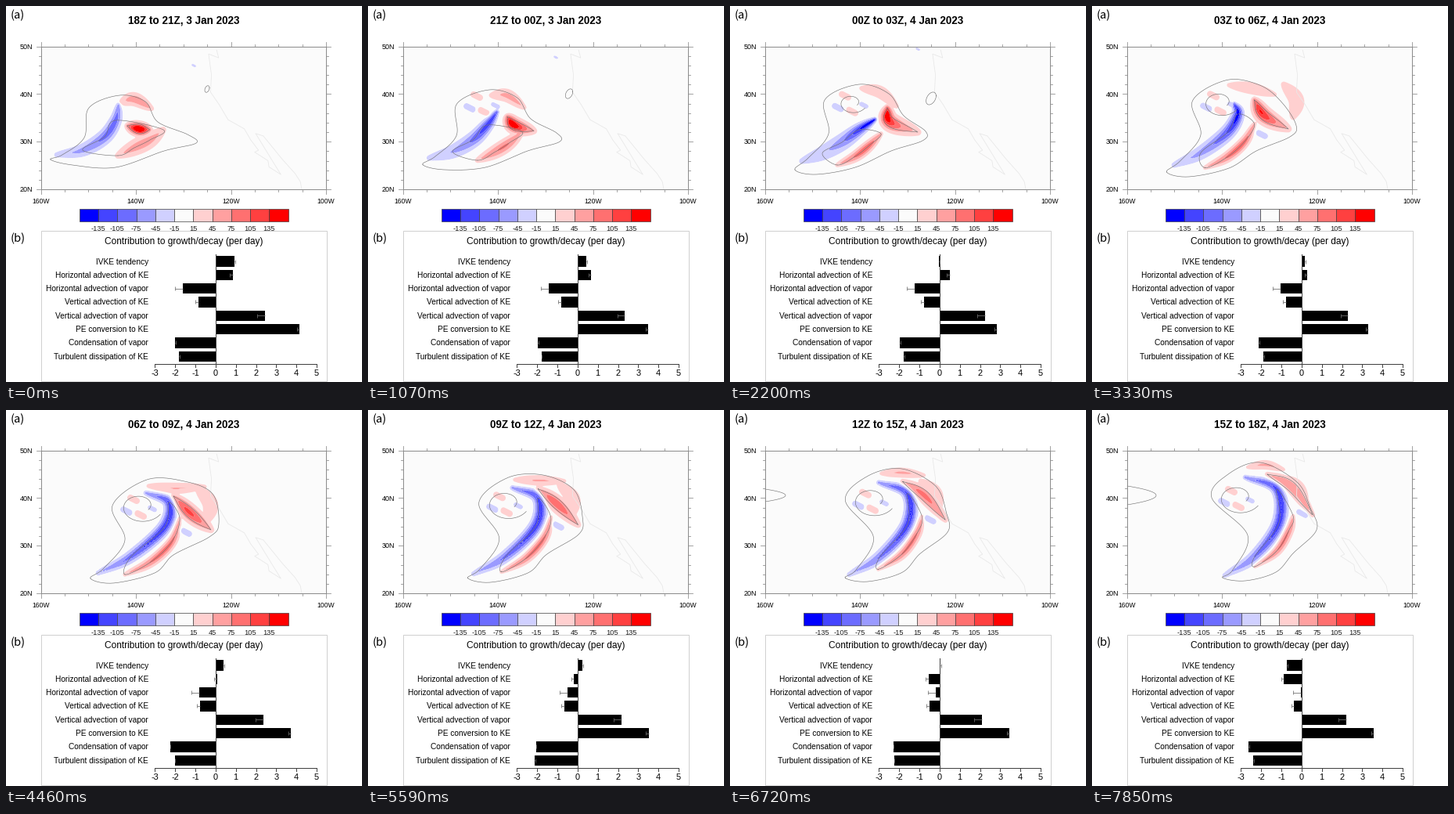
Write a matplotlib script that moves like this. It is 455 by 480 pixels and loops after 8000 ms.

```python
import numpy as np
import matplotlib.pyplot as plt
from matplotlib.animation import FuncAnimation
from matplotlib.patches import Rectangle

W, H, DPI = 455, 480, 100
INTERVAL, LOOP = 40, 8000
SCENES, HOLD = 8, 1130
PT = 72 / DPI
LEFT, TOP, WIDE, TALL = 44.5, 51.5, 364.5, 182.5     # map frame, 160W to 100W, 50N to 20N
ZERO, UNIT, AXIS_Y = 267.8, 25.85, 456.5             # bar chart axis
LEVELS = np.arange(-135, 136, 30)
SHADES = ["#0000ff", "#4444ff", "#6c6cff", "#9a9aff", "#d0d0ff", "#fbfbfb",
          "#ffd0d0", "#ffa0a0", "#ff7070", "#ff4040", "#ff0000"]
COLD, WARM = -1, 1

fig = plt.figure(figsize=(W / DPI, H / DPI), dpi=DPI, facecolor="white")
ax = fig.add_axes([0, 0, 1, 1])
ax.set(xlim=(0, W), ylim=(H, 0))
ax.autoscale(False)
ax.axis("off")
plt.rcParams["font.family"] = "Liberation Sans"


def text(x, y, s, px, ha="center", **kw):
    return ax.text(x, y, s, fontsize=px * PT, ha=ha, va="baseline", **kw)


def line(x, y, color="black", px=1, z=3):
    return ax.plot(x, y, color=color, lw=px * PT, zorder=z)[0]


def box(x, y, w, h, face="none", edge="none", px=1, z=2):
    ax.add_patch(Rectangle((x, y), w, h, fc=face, ec=edge, lw=px * PT, zorder=z))


def spline(pts, closed=False, n=48):
    """Catmull-Rom curve through a few points."""
    p = np.array(pts, float)
    if closed:
        p = np.vstack([p[-1:], p, p[:2]])
    else:
        p = np.vstack([2 * p[0] - p[1], p, 2 * p[-1] - p[-2]])
    t = np.linspace(0, len(p) - 3, n)
    i = np.minimum(t.astype(int), len(p) - 4)
    u = (t - i)[:, None]
    a, b, c, d = p[i], p[i + 1], p[i + 2], p[i + 3]
    return 0.5 * (2 * b + (c - a) * u + (2 * a - 5 * b + 4 * c - d) * u**2
                  + (3 * b - a - 3 * c + d) * u**3)


def at(keys, k):
    """Value at time step k, moving linearly between key steps."""
    steps = sorted(keys)
    v = np.array([keys[s] for s in steps], float)
    cols = v.reshape(len(steps), -1).T
    return np.array([np.interp(k, steps, c) for c in cols]).reshape(v.shape[1:])


# ---- storm: band spines from tail to head; cores are (peak, place of peak, half width)
COLD_BAND = {0: ((65, 190), (98, 184), (126, 167), (140, 146), (144, 126)),
             2: ((92, 198), (118, 188), (143, 174), (165, 158), (185, 145)),
             4: ((118, 208), (160, 187), (203, 149), (208, 118), (179, 106)),
             7: ((170, 211), (208, 187), (239, 144), (236, 101), (196, 86))}
COLD_CORE = {0: (95, .65, 10), 2: (165, .95, 11), 4: (140, .55, 10), 7: (140, .6, 10)}

TOP_BAND = {0: ((147, 123), (164, 119), (186, 131)), 2: ((168, 105), (192, 110), (213, 128)),
            4: ((182, 97), (215, 100), (254, 98)), 7: ((199, 73), (222, 70), (245, 76))}
TOP_CORE = {0: (65, .6, 9), 2: (44, .6, 8), 7: (50, .5, 6)}

FRONT_BAND = {0: ((155, 153), (170, 157), (184, 158)), 2: ((201, 130), (205, 148), (240, 161)),
              4: ((214, 110), (236, 132), (262, 153)), 7: ((224, 82), (255, 98), (282, 134))}
FRONT_CORE = {0: (185, .5, 11), 2: (165, .3, 13), 4: (115, .45, 12), 7: (75, .5, 9)}

LOW_BAND = {0: ((143, 191), (164, 181), (184, 171), (201, 158)),
            2: ((137, 203), (160, 192), (178, 178), (193, 163)),
            4: ((152, 210), (185, 194), (212, 168), (222, 138)),
            7: ((208, 200), (236, 180), (252, 153), (257, 135))}
LOW_CORE = {0: (62, .5, 11), 2: (100, .55, 8), 7: (85, .5, 7)}

FLANK_BAND = {4: ((245, 100), (261, 120), (257, 142)), 7: ((243, 86), (262, 97), (274, 114))}
FLANK_CORE = {4: (44, .5, 10), 7: (44, .5, 8)}

OUTLINE = {0: ((57, 196), (85, 203), (140, 206), (202, 185), (243, 175), (232, 164),
               (194, 148), (178, 122), (145, 114), (106, 130), (100, 168), (72, 190)),
           2: ((83, 209), (110, 215), (160, 206), (206, 185), (246, 172), (250, 160),
               (222, 140), (203, 112), (165, 100), (121, 120), (126, 163), (100, 194)),
           4: ((108, 215), (137, 221), (190, 208), (214, 185), (260, 162), (272, 145),
               (264, 107), (228, 91), (180, 89), (136, 122), (152, 166), (125, 202)),
           7: ((167, 214), (196, 218), (235, 207), (257, 183), (287, 153), (279, 125),
               (262, 92), (215, 67), (174, 82), (153, 112), (199, 160), (180, 204))}
VORTEX = {1: (148, 124), 4: (172, 123), 7: (187, 112)}


def band(sign, spine, core, k):
    """Ridge of (x, y, half width, strength) that tapers to both ends."""
    peak, place, half = at(core, k)
    p = spline(at(spine, k))
    s = np.linspace(0, 1, len(p))
    h = half * np.sin(np.pi * (.07 + .86 * s)) ** .7
    a = 36 + (peak - 36) * np.exp(-((s - place) / .38) ** 2)
    return sign, np.column_stack([p, h, a])


def blob(sign, x, y, r=4):
    t = np.linspace(-1, 1, 9)
    return sign, np.column_stack([x + r * t, y + r * t / 2, r + 0 * t, 38 + 0 * t])


def ridges(k):
    out = [band(COLD, COLD_BAND, COLD_CORE, k), band(WARM, TOP_BAND, TOP_CORE, k),
           band(WARM, FRONT_BAND, FRONT_CORE, k), band(WARM, LOW_BAND, LOW_CORE, k)]
    if k > 0:
        x, y = at(VORTEX, k)
        out += [blob(COLD, x - 18, y + 6), blob(WARM, x - 9, y - 9),
                blob(WARM, x, y + 11), blob(COLD, x + 15, y + 3, 3)]
    if k < 3:
        out.append(blob(COLD, 240, 76 - 10.5 * k, 1.5))
    else:
        out.append(band(WARM, FLANK_BAND, FLANK_CORE, k))
        out.append(blob(COLD, 230 + 13 * (k - 4), 156 - 8 * (k - 4)))
    return out


def lens(p, half):
    """Thin closed loop around a spine."""
    n = np.gradient(p, axis=0)[:, ::-1] * (1, -1)
    n /= np.hypot(*n.T)[:, None]
    n *= half * np.sin(np.linspace(0, np.pi, len(p)))[:, None]
    return np.vstack([p + n, (p - n)[::-1]])


def contours(k):
    cold, low = at(COLD_BAND, k), at(LOW_BAND, k)
    out = [spline(at(OUTLINE, k), True, 200),
           spline(np.vstack([low, cold[3:0:-1]]), True, 120),
           lens(spline(at(FRONT_BAND, k)), 6)]
    if k > 1:                                        # spiral around the vortex
        s = np.linspace(0, 1, 60)
        turn, r = .5 + 6.3 * s, (25 - 15 * s) * min(1, .25 + k / 5)
        out.append(at(VORTEX, k) + np.column_stack([1.15 * r * np.cos(turn),
                                                    .85 * r * np.sin(turn)]))
    if k < 3:                                        # small eddy at the coast
        t = np.linspace(0, 2 * np.pi, 30)
        r = 3 + 1.7 * k
        out.append(np.column_stack([257 + r * np.cos(t),
                                    106 + 6 * k - r * .5 * np.cos(t) + (r + 1) * np.sin(t)]))
    if k > 5:                                        # contour entering from the west
        u = np.linspace(-1, 1, 30)
        out.append(np.column_stack([45 + (26 + 11 * (k - 6)) * (1 - u**2),
                                    109 + (8 + 4 * (k - 6)) * u]))
    return out


# ---- bar values per day, one row per measured step
NAMES = ["IVKE tendency", "Horizontal advection of KE", "Horizontal advection of vapor",
         "Vertical advection of KE", "Vertical advection of vapor", "PE conversion to KE",
         "Condensation of vapor", "Turbulent dissipation of KE"]
BARS = {0: (.93, .85, -1.62, -.85, 2.43, 4.14, -1.99, -1.82),
        2: (-.03, .5, -1.24, -.76, 2.26, 2.84, -1.96, -1.76),
        4: (.39, .07, -.81, -.78, 2.35, 3.74, -2.25, -2.02),
        5: (.23, -.19, -.48, -.66, 2.16, 3.51, -2.06, -2.13),
        6: (.03, -.55, -.17, -.5, 2.09, 3.44, -2.29, -2.25),
        7: (-.72, -.88, -.04, -.36, 2.2, 3.56, -2.63, -2.4)}
ERRORS = np.array([.04, -.13, -.39, -.15, -.38, -.12, .03, .03])
ROWS = 326 + 17.33 * np.arange(8)

# ---- fixed parts
text(6, 16, "(a)", 14.8, "left", family="Noto Sans CJK JP")
text(6, 301, "(b)", 14.8, "left", family="Noto Sans CJK JP")

GREY = "#8c8c8c"
box(LEFT, TOP, WIDE, TALL, "#fbfbfb", z=0)
box(LEFT, TOP, WIDE, TALL, edge=GREY, z=4)
right, bottom = LEFT + WIDE, TOP + TALL
for lon in range(0, 61, 5):
    x, n = LEFT + lon * WIDE / 60, 3 if lon % 20 else 6
    line([x, x], [TOP - n, TOP], GREY, .8)
    line([x, x], [bottom, bottom + n], GREY, .8)
    if n == 6:
        text(x, 252, f"{160 - lon}W", 8.7)
for lat in range(0, 31, 2):
    y, n = TOP + lat * TALL / 30, 3 if lat % 10 else 6
    line([LEFT - n, LEFT], [y, y], GREY, .8)
    line([right, right + n], [y, y], GREY, .8)
    if n == 6:
        text(34.5, y + 3.3, f"{50 - lat}N", 9, "right")

COAST = ((123, 49.2), (122.6, 47.6), (124.7, 48.4), (124.1, 44), (124.3, 40.4), (122.5, 37.8),
         (120.6, 34.6), (117.2, 32.7), (115.8, 30.3), (114.2, 28.2), (115, 27.8), (112.2, 26),
         (112, 24.7), (109.5, 23.1), (111.3, 26), (114.8, 31.7), (113.2, 31.2), (109.2, 26.3),
         (106.5, 23.3), (105.4, 21.6), (105.1, 20))
west, north = np.array(COAST).T
line(LEFT + (160 - west) * WIDE / 60, TOP + (50 - north) * TALL / 30, "#e8e8e8", .8)

step = 267 / 11
for i, shade in enumerate(SHADES):
    box(93.7 + i * step, 258.5, step, 16, shade, "#404040", .7)
for i, level in enumerate(LEVELS):
    text(93.7 + (i + 1) * step, 287, str(level), 9.3, color="#222222")

box(44.5, 286.5, 365, 192, edge="#d0d0d0", z=1)
text(227, 304.3, "Contribution to growth/decay (per day)", 11.9)
for y, name in zip(ROWS, NAMES):
    text(182, y + 3.5, name, 10.15, "right")
line([ZERO - 3 * UNIT, ZERO + 5 * UNIT], [AXIS_Y, AXIS_Y], "#404040")
line([ZERO, ZERO], [317, AXIS_Y], "#404040")
for v in range(-3, 6):
    x = ZERO + v * UNIT
    line([x, x], [AXIS_Y, AXIS_Y + 4], "#404040")
    text(x, 472, str(v), 11)

# ---- one group of artists per time step
X, Y = np.meshgrid(np.arange(46, 300, 1.5), np.arange(53, 233, 1.5))


def field(k):
    part = {COLD: np.zeros_like(X), WARM: np.zeros_like(X)}
    for sign, p in ridges(k):
        x, y, h, a = p.T
        d2 = (X[..., None] - x) ** 2 + (Y[..., None] - y) ** 2
        v = (a * np.exp(-d2 * np.log(a / 15) / h**2)).max(-1)
        part[sign] = np.maximum(part[sign], v)
    return part[WARM] - part[COLD]


def build(k):
    hour = 18 + 3 * k
    title = f"{hour % 24:02d}Z to {(hour + 3) % 24:02d}Z, {3 + hour // 24} Jan 2023"
    group = [text(227, 22.5, title, 13.5, weight="bold")]
    bounds = [-999, *LEVELS, 999]
    group.append(ax.contourf(X, Y, field(k), bounds, colors=SHADES, antialiased=True, zorder=1))
    group += [line(*p.T, "#707070", .6) for p in contours(k)]
    values = at(BARS, k)
    ends, tips = ZERO + UNIT * values, ZERO + UNIT * (values + ERRORS)
    group += ax.barh(ROWS, ends - ZERO, 13.4, left=ZERO, color="black", zorder=2)
    group.append(ax.hlines(ROWS, ends, tips, color="#707070", lw=.8 * PT, zorder=4))
    group.append(ax.vlines(tips, ROWS - 2.5, ROWS + 2.5, color="#707070", lw=.8 * PT, zorder=4))
    return group


groups = [build(k) for k in range(SCENES)]
ax.set(xlim=(0, W), ylim=(H, 0))


def draw(frame):
    now = (frame * INTERVAL + 90) // HOLD
    for k, group in enumerate(groups):
        for artist in group:
            artist.set_visible(k == now)
    return groups[now]


anim = FuncAnimation(fig, draw, frames=LOOP // INTERVAL, interval=INTERVAL,
                     init_func=lambda: draw(0), repeat=True, repeat_delay=0)
plt.show()
```
